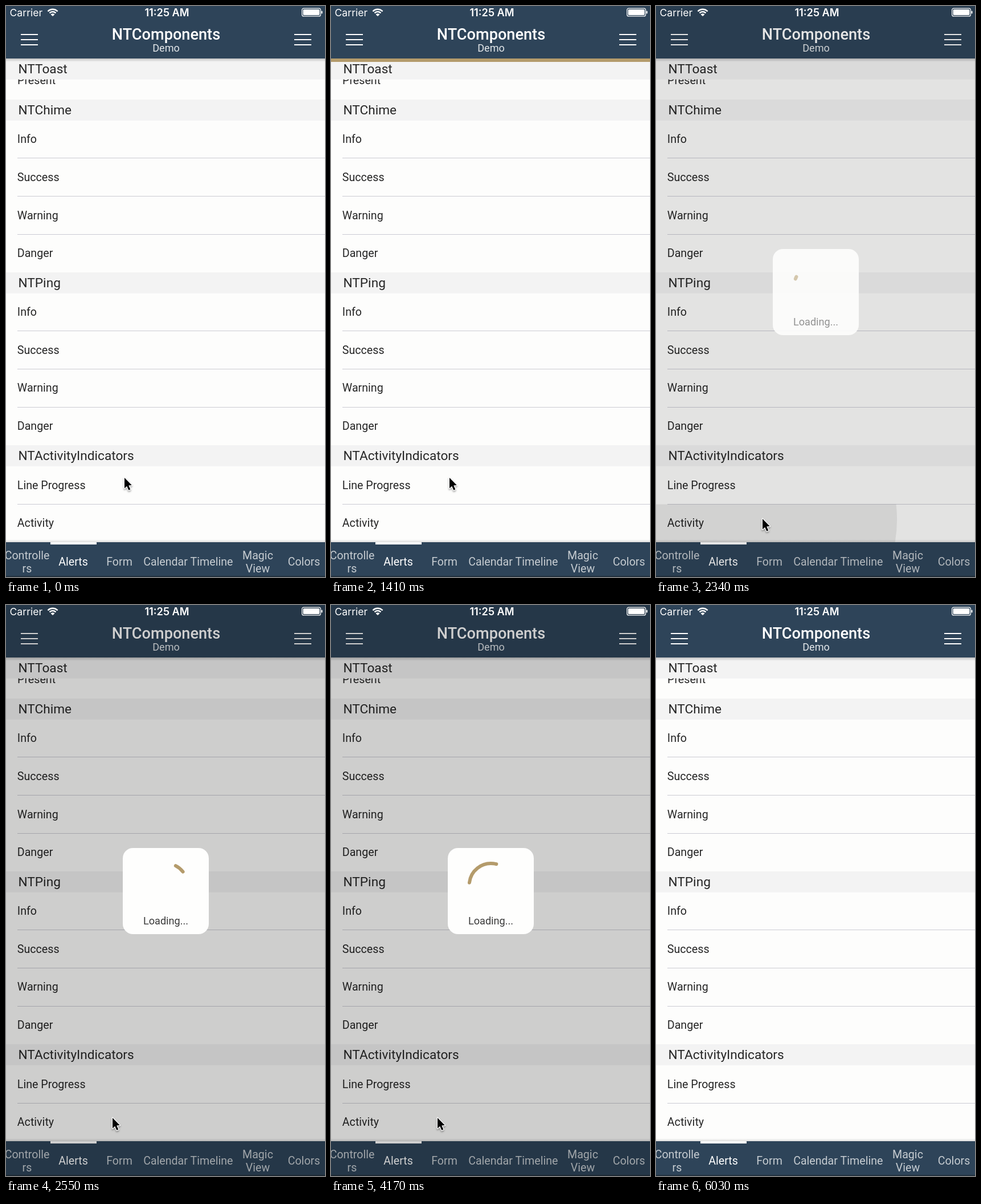
An HTML page with a canvas that plays this animation: 560x1001 px, repeating every 6.06 s.

```html
<!DOCTYPE html>
<html lang="en">
<head>
<meta charset="utf-8">
<title>NTComponents demo</title>
<style>
html, body { margin: 0; width: 100%; height: 100%; overflow: hidden; background: #fdfdfc; }
canvas { display: block; width: 560px; height: 1001px; }
</style>
</head>
<body>
<canvas id="stage" width="560" height="1001"></canvas>
<script>
const ctx = document.getElementById('stage').getContext('2d');
const LOOP = 6060, W = 560, H = 1001;
const NAVY = '#2e4459', TAN = '#b49b6b', INK = '#262626';
const SANS = 'Roboto, sans-serif';

const clamp = v => Math.max(0, Math.min(1, v));
const ramp = (t, from, to) => clamp((t - from) / (to - from));
const ease = v => v * v * (3 - 2 * v);

function rect(x, y, w, h, color) {
  ctx.fillStyle = color;
  ctx.fillRect(x, y, w, h);
}

function text(str, x, y, size, color, align = 'left', weight = 400, family = SANS) {
  ctx.font = `${weight} ${size}px ${family}`;
  ctx.textAlign = align;
  ctx.fillStyle = color;
  ctx.fillText(str, x, y);
}

function shade(y, h, from, to) {
  const g = ctx.createLinearGradient(0, y, 0, y + h);
  g.addColorStop(0, from);
  g.addColorStop(1, to);
  rect(0, y, W, h, g);
}

// Linear interpolation through [time, ...values] keys
function track(keys, t) {
  let i = 0;
  while (i < keys.length - 2 && t > keys[i + 1][0]) i++;
  const a = keys[i], b = keys[i + 1], k = ramp(t, a[0], b[0]);
  return a.slice(1).map((v, n) => v + (b[n + 1] - v) * k);
}

const sections = [
  ['NTChime', 164, ['Info', 'Success', 'Warning', 'Danger']],
  ['NTPing', 466.7, ['Info', 'Success', 'Warning', 'Danger']],
  ['NTActivityIndicators', 770.4, ['Line Progress', 'Activity']]
];
const ROW = 66.7, HEAD = 36.7;

function drawHeader(label, y) {
  rect(0, Math.round(y), W, HEAD, '#f3f3f3');
  text(label, 21.5, y + 26, 22.65, INK);
}

function drawList() {
  rect(0, 0, W, H, '#fdfdfc');
  text('Present', 20, 136.5, 19.65, INK);
  drawHeader('NTToast', 92);
  for (const [label, top, rows] of sections) {
    drawHeader(label, top);
    rows.forEach((row, i) => {
      const y = top + HEAD + i * ROW;
      text(row, 19.8, y + 39.5, 19.65, INK);
      if (i < rows.length - 1) rect(20, Math.round(y + ROW) - 1, W - 20, 1, '#cbcbd3');
    });
  }
}

function drawRipple(t, start, x, y, top) {
  const alpha = 0.075 * (1 - ramp(t, start + 300, start + 480));
  if (t < start || alpha <= 0) return;
  ctx.save();
  ctx.beginPath();
  ctx.rect(0, top, W, ROW);
  ctx.clip();
  ctx.beginPath();
  ctx.arc(x, y, 420 * ramp(t, start, start + 480), 0, 7);
  ctx.fillStyle = `rgba(0,0,0,${alpha})`;
  ctx.fill();
  ctx.restore();
}

function drawMenu(x) {
  for (const y of [49, 58, 67]) rect(x, y, 30, 2, '#fff');
}

function drawNav() {
  shade(92, 6, 'rgba(0,0,0,.2)', 'rgba(0,0,0,0)');
  rect(0, 0, W, 92, NAVY);
  text('NTComponents', 281, 58.5, 27.15, '#fff', 'center', 500);
  text('Demo', 281, 80, 18.1, '#e3e7ea', 'center');
  drawMenu(26);
  drawMenu(506);
}

function drawTabs() {
  shade(935, 5, 'rgba(0,0,0,0)', 'rgba(0,0,0,.12)');
  rect(0, 940, W, 61, NAVY);
  rect(0, 999, W, 2, '#22313f');
  rect(78, 940, 81, 4, '#fff');
  const tabs = ['Controlle|rs', 'Alerts', 'Form', 'Calendar', 'Timeline', 'Magic|View', 'Colors'];
  tabs.forEach((tab, i) => {
    const lines = tab.split('|');
    const y = lines.length > 1 ? 969.5 : 980.5;
    const color = i === 1 ? '#fff' : '#c6ccd1';
    lines.forEach((line, n) => text(line, 37 + 81 * i, y + 23 * n, 19.6, color, 'center'));
  });
}

function drawStatus() {
  const family = 'Inter, sans-serif';
  text('Carrier', 6.5, 17.5, 17.6, '#fff', 'left', 400, family);
  text('11:25 AM', 282.5, 17.5, 18.2, '#fff', 'center', 600, family);
  ctx.strokeStyle = '#fff';
  ctx.lineCap = 'butt';
  ctx.lineWidth = 2.4;
  for (const r of [7.5, 11.7]) {
    ctx.beginPath();
    ctx.arc(82, 17.5, r, -Math.PI * 0.76, -Math.PI * 0.24);
    ctx.stroke();
  }
  ctx.beginPath();
  ctx.moveTo(82, 18);
  ctx.arc(82, 18, 4.8, -Math.PI * 0.76, -Math.PI * 0.24);
  ctx.fillStyle = '#fff';
  ctx.fill();
  ctx.lineWidth = 1.2;
  ctx.beginPath();
  ctx.roundRect(519.6, 4.1, 32.8, 13.8, 3);
  ctx.stroke();
  ctx.beginPath();
  ctx.roundRect(521.5, 6, 29, 10, 1.5);
  ctx.roundRect(553.5, 8.5, 2, 5, 1);
  ctx.fill();
}

function drawProgress(t) {
  const width = W * ease(ramp(t, 380, 1350));
  if (width <= 0 || t >= 1560) return;
  ctx.globalAlpha = 1 - ramp(t, 1440, 1560);
  rect(0, 92, width, 6, TAN);
  ctx.globalAlpha = 1;
}

// Arc ends in degrees: tail, head
const spin = [
  [2160, 190, 190], [2340, 199, 205], [3270, 630, 720],
  [3870, 733, 969], [4170, 906, 1004], [4530, 1070, 1217], [4620, 1110, 1265]
];

function drawLoader(t) {
  const shown = ease(ramp(t, 2175, 2490)) * (1 - ease(ramp(t, 4260, 4605)));
  if (shown <= 0) return;
  rect(0, 0, W, H, `rgba(0,0,0,${0.19 * shown})`);
  ctx.globalAlpha = 1 - (1 - shown) ** 3;
  ctx.beginPath();
  ctx.roundRect(205, 426, 151, 151, 18);
  ctx.fillStyle = '#fefefd';
  ctx.fill();
  ctx.globalAlpha = shown;
  text('Loading...', 280.5, 559.5, 18.1, '#3a3a3a', 'center');
  const [tail, head] = track(spin, t).map(a => a * Math.PI / 180);
  ctx.beginPath();
  ctx.arc(280.7, 491, 38, tail, head);
  ctx.strokeStyle = TAN;
  ctx.lineWidth = 6;
  ctx.lineCap = 'round';
  ctx.stroke();
  ctx.globalAlpha = 1;
}

const pointer = [
  [0, 207, 826], [1560, 207, 826], [1860, 186, 898],
  [4290, 186, 898], [4470, 190, 1010], [LOOP, 190, 1010]
];
const arrow = [[0, 0], [0, 18.5], [4.2, 14.7], [7.3, 21.8], [10.3, 20.5], [7.3, 13.5], [12.8, 13.1]];

function drawPointer(t) {
  const [x, y] = track(pointer, t);
  ctx.save();
  ctx.translate(x + 1, y + 1);
  ctx.beginPath();
  arrow.forEach(p => ctx.lineTo(...p));
  ctx.closePath();
  ctx.shadowColor = 'rgba(0,0,0,.35)';
  ctx.shadowBlur = 3;
  ctx.shadowOffsetY = 2;
  ctx.lineJoin = 'round';
  ctx.lineWidth = 2.6;
  ctx.strokeStyle = '#fff';
  ctx.stroke();
  ctx.shadowColor = 'transparent';
  ctx.fillStyle = '#000';
  ctx.fill();
  ctx.restore();
}

function draw(t) {
  drawList();
  drawRipple(t, 180, 207, 828, 806.7);
  drawRipple(t, 2070, 186, 900, 873.4);
  drawNav();
  drawTabs();
  drawProgress(t);
  drawLoader(t);
  drawStatus();
  drawPointer(t);
}

const began = performance.now();
function tick() {
  draw((performance.now() - began) % LOOP);
  requestAnimationFrame(tick);
}
tick();
</script>
</body>
</html>
```
